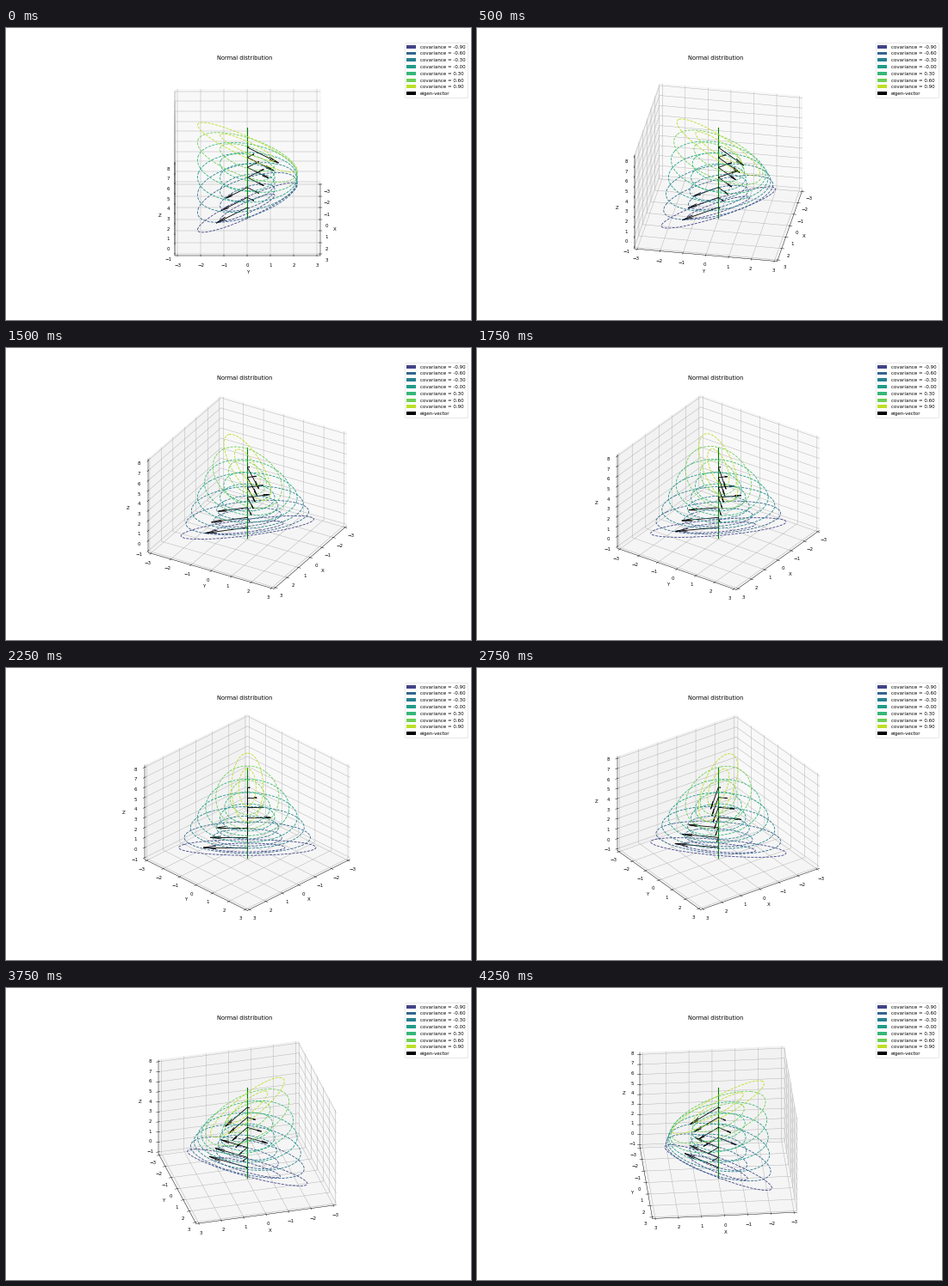
A matplotlib script that plays this animation: 540 px wide and 340 px high, repeating every 4500 ms.

```python
import numpy as np
import matplotlib.pyplot as plt
from matplotlib.animation import FuncAnimation
from matplotlib.patches import Patch

FRAMES, INTERVAL, AZIM_STEP = 18, 250, 5
COVARIANCES = [0.3 * k for k in range(-3, 4)]
DENSITY_LEVELS = [0.1, 0.5]

plt.rcParams.update({"font.family": "DejaVu Sans", "font.size": 10})
fig = plt.figure(figsize=(13.5, 8.5), dpi=40)
ax = fig.add_subplot(projection="3d", proj_type="ortho")
ax.set_title("Normal distribution")

colors = plt.cm.viridis(np.linspace(0.2, 0.9, len(COVARIANCES)))
grid_x, grid_y = np.meshgrid(*[np.linspace(-3, 3, 100)] * 2)


def relative_density(cov):
    """Bivariate normal density scaled to a peak of one."""
    form = grid_x**2 - 2 * cov * grid_x * grid_y + grid_y**2
    return np.exp(-0.5 * form / (1 - cov**2))


def scaled_eigenvectors(cov):
    """Eigenvectors of [[1, cov], [cov, 1]], as long as their eigenvalues."""
    root = np.sqrt(0.5)
    sign = 1 if cov < 0 else -1
    return [((1 + cov) * root, (1 + cov) * root),
            (sign * (1 - cov) * root, -sign * (1 - cov) * root)]


def draw_level(height, cov, color):
    ax.contour(grid_x, grid_y, relative_density(cov), levels=DENSITY_LEVELS,
               colors=[color], linestyles="dashed", offset=height)
    for u, v in scaled_eigenvectors(cov):
        ax.quiver(0, 0, height, u, v, 0, color="black")


for level, (cov, color) in enumerate(zip(COVARIANCES, colors)):
    draw_level(level, cov, color)
ax.plot([0, 0], [0, 0], [-1, 8], color="green", lw=2)

# Panes reach slightly past the outermost ticks.
ax.set(xlim=(-3.125, 3.125), ylim=(-3.125, 3.125), zlim=(-1.1875, 8.1875),
       xticks=range(-3, 4), yticks=range(-3, 4), zticks=range(-1, 9),
       xlabel="X", ylabel="Y", zlabel="Z")

labels = [f"covariance = {'-' if c <= 0 else ''}{abs(c):.2f}" for c in COVARIANCES]
handles = [Patch(facecolor=c, label=t) for c, t in zip(colors, labels)]
handles.append(Patch(facecolor="black", label="eigen-vector"))
for handle in handles:
    handle.set_linewidth(0)
ax.legend(handles=handles, loc="upper right", bbox_to_anchor=(1.5, 1.1))


def update(frame):
    ax.view_init(elev=30, azim=AZIM_STEP * frame)
    return []


anim = FuncAnimation(fig, update, frames=FRAMES, interval=INTERVAL,
                     repeat=True, repeat_delay=0)
plt.show()
```
